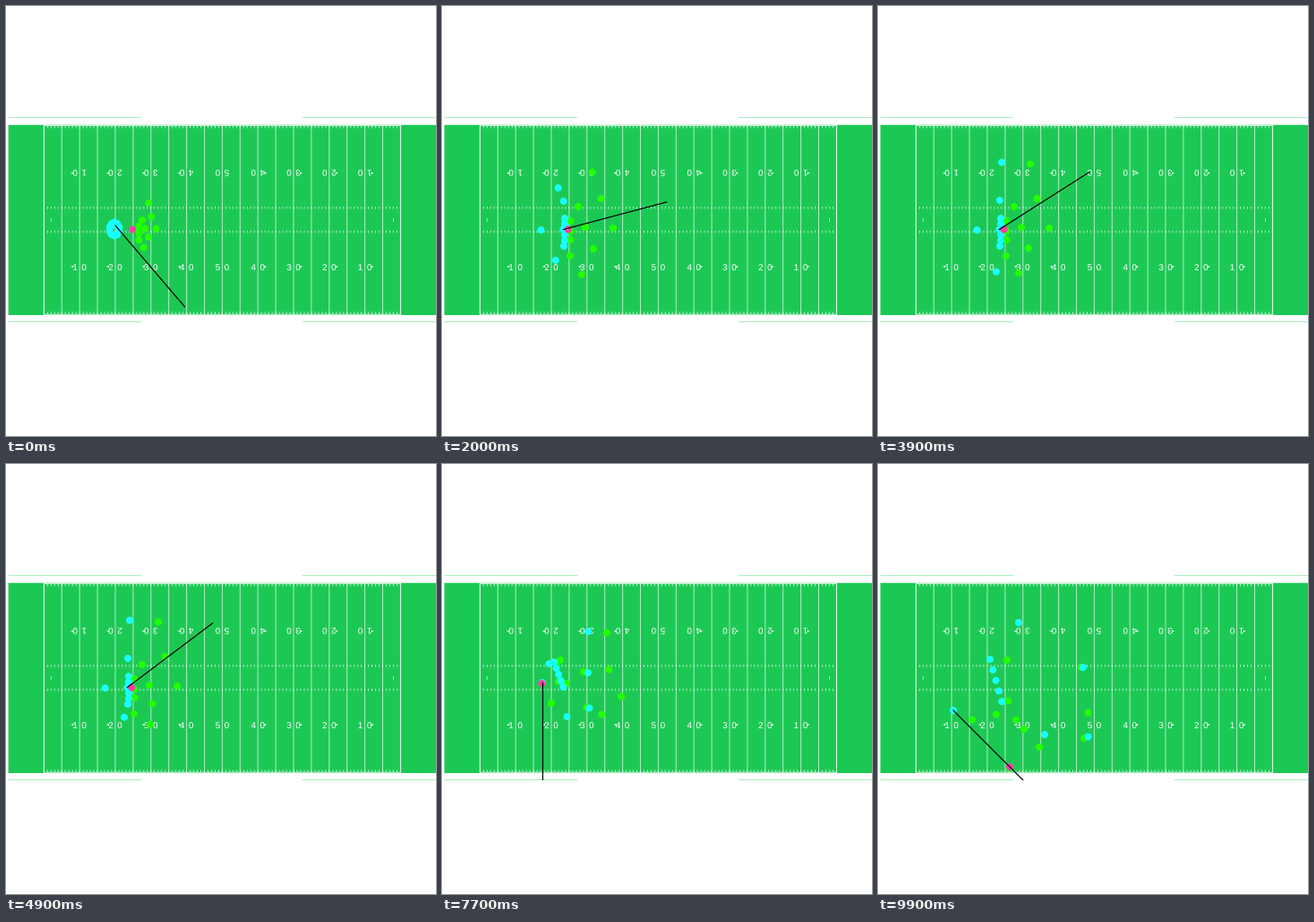
Write a matplotlib script that moves like this. It is 480 px wide and 480 px high and loops after 10 s.

```python
import numpy as np
import matplotlib.pyplot as plt
from matplotlib.animation import FuncAnimation
from matplotlib.patches import Circle, PathPatch, Polygon, Rectangle
from matplotlib.textpath import TextPath
from matplotlib.transforms import Affine2D

SIZE, DPI = 480, 100
PT = 72 / DPI  # points per pixel
FRAMES, STEP_MS = 100, 100

YARD = 3.98
MID_X, MID_Y = 241.4, 238.9
HALF = 53.33 * YARD / 2
TOP, BOTTOM = MID_Y - HALF, MID_Y + HALF
GRASS, PALE = "#1cc854", "#a9ecc0"
CYAN, LIME, PINK = "#19ffff", "#22ff00", "#ff3fa4"
RADIUS = 4
GAZE = 30 * YARD

# Phases of the play, in frames.
SHIFT, SHIFTED, SNAP, FAKE, THROW, LAST = 36, 60, 65, 77, 88, FRAMES - 1

# Each player: spot at the snap, at the fake and at the catch.
# A spot in front of these is where a shifting player first lines up.
PASSER = [(135.3, 249.5), (112, 244), (84, 275)]
SPLIT = [(138, 174.5), (163, 187), (229, 227)]
SLOT = [(136, 217), (163, 233), (186, 302)]
TIGHT = [(136, 268), (164.5, 272.5), (234.5, 304.5)]
MOTION = [(132, 301), (132, 267), (139.5, 282), (147, 338)]
TAIL = [(110.5, 250), (119.5, 223), (157, 177)]
LINE = [[(137, 237 + 6.2 * i), (125 + 2.6 * i, 221 + 7 * i),
         (125 + 3.3 * i, 218 + 11.8 * i)] for i in range(5)]

DEFENSE = [
    [(152, 224), (132, 219), (144, 219)],
    [(143.5, 240), (128, 223), (145.5, 264.5)],
    [(143.5, 251.5), (139, 245), (154, 285.5)],
    [(143.5, 261), (130, 243), (132, 279.5)],
    [(143, 279), (122, 267), (105, 285.5)],
    [(177.5, 215), (186.5, 229.5), (234.5, 277.5)],
    [(160, 247), (158, 232), (163, 296)],
    [(169, 271), (159, 265), (161.5, 271.5), (180, 316)],
    [(156, 300.5), (165, 282.5), (178.5, 279.5), (146, 339)],
]

# Where the passer faces: (frame, degrees).
FACING = [(0, -49.5), (11, 14.3), (22, 15), (29, 28), (49, 37), (62, 50),
          (66, 81), (FAKE, 270), (LAST, 315)]


def tween(times, points):
    """Follow the points at an even pace, speeding up out of the snap."""
    t = np.arange(FRAMES, dtype=float)
    u = np.clip((t - SNAP) / (FAKE - SNAP), 0, 1)
    t = np.where((u > 0) & (u < 1), SNAP + (FAKE - SNAP) * u ** 1.5, t)
    return np.stack([np.interp(t, times, axis) for axis in zip(*points)], axis=1)


def run(start, spots):
    """Jog from the huddle to the line, wait, then play."""
    if len(spots) == 3:
        spots = [spots[0], *spots]
    arrive = 10 + 0.34 * np.hypot(*np.subtract(spots[0], start))
    times = (0, arrive, SHIFT, SHIFTED, FAKE, LAST)
    lineup, ready, fake, end = spots
    before = tween(times[:4], [start, lineup, lineup, ready])
    after = tween((SNAP, FAKE, LAST), [ready, fake, end])
    return np.where(np.arange(FRAMES)[:, None] < SNAP, before, after)


def huddle(k):
    a = np.radians(54 + 108 * k)
    return 121 + 5.5 * np.cos(a), 249 + 7.5 * np.sin(a)


def loose(spot, centre=(152, 249)):
    """Defenders wait in a shrunken copy of their formation."""
    return np.add(centre, 0.4 * np.subtract(spot, centre))


def cover(receiver, cushion):
    """Man coverage: the cushion closes until the defender is beaten."""
    return [tuple(np.add(spot, np.multiply(cushion, k)))
            for spot, k in zip(receiver, (1, 0.65, -0.08))]


def ball_path(passer):
    f = np.arange(FRAMES)[:, None]
    spot = np.array([141, 249.5]) - f / SNAP * (1, 0)
    held = spot + (passer + (-0.5, 1) - spot) * np.clip((f - SNAP) / 3, 0, 1)
    flight = np.clip((f - THROW) / (LAST - THROW), 0, 1)
    return held + (np.array(MOTION[-1]) - held) * flight


fig = plt.figure(figsize=(SIZE / DPI, SIZE / DPI), dpi=DPI, facecolor="white")
ax = fig.add_axes([0, 0, 1, 1])
ax.set(xlim=(0, SIZE), ylim=(SIZE, 0))
ax.axis("off")


def yard(n):
    return MID_X + (n - 50) * YARD


def rows(y, x0, x1, color="white", alpha=1):
    ax.hlines(y, x0, x1, color=color, lw=PT, alpha=alpha, snap=False)


def columns(x, y0, y1, alpha):
    ax.vlines(x, y0, y1, color="white", lw=PT, alpha=alpha, snap=False)


def draw_digit(x, y, digit, flip):
    path = TextPath((0, 0), digit, size=9.8, prop={"family": "Liberation Sans"})
    box = path.get_extents()
    turn = (-1, 1) if flip else (1, -1)
    place = (Affine2D().translate(-(box.x0 + box.x1) / 2, -(box.y0 + box.y1) / 2)
             .scale(*turn).translate(x, y))
    ax.add_patch(PathPatch(path, transform=place + ax.transData,
                           fc="white", ec="none", zorder=2))


def draw_number(n, y, flip):
    label, side, x = str(min(n, 100 - n)), np.sign(n - 50), yard(n)
    for dx, digit in zip((-5, 5), label[::-1] if flip else label):
        draw_digit(x + dx, y, digit, flip)
    if side:
        tip, base, cy = x + side * 10, x + side * 7, y + (0.4 if flip else -0.6)
        ax.add_patch(Polygon([(tip, cy), (base, cy - 1.2), (base, cy + 1.2)],
                             fc="white", ec="none", zorder=2))


def draw_field():
    ax.add_patch(Rectangle((yard(-10), TOP), 120 * YARD, BOTTOM - TOP,
                           fc=GRASS, ec="none", snap=False))
    for y in (124.5, 352.5):
        rows([y, y], [3, 331], [151, SIZE], PALE)
    rows([TOP + 0.8, BOTTOM - 0.8], yard(0), yard(100), alpha=0.8)
    columns([yard(0), yard(100)], TOP, BOTTOM, 0.95)
    columns([yard(n) for n in range(5, 100, 5)], TOP, BOTTOM, 0.65)
    columns([yard(2), yard(98)], MID_Y - 2, MID_Y + 2, 0.65)
    ticks = [yard(n) for n in range(1, 100)]
    for y in (TOP + 2.4, 225.3, 252, BOTTOM - 2.4):
        columns(ticks, y - 1.3, y + 1.3, 0.65)
    for n in range(10, 100, 10):
        draw_number(n, 291.6, False)
        draw_number(n, 186.2, True)


def draw_dots(count, color, z):
    return [ax.add_patch(Circle((0, 0), RADIUS, fc=color, ec="none", zorder=z))
            for _ in range(count)]


draw_field()

passer = run((122, 245), PASSER)
blockers_and_backs = LINE + [SPLIT, SLOT, TIGHT, MOTION, TAIL]
defenders = DEFENSE + [cover(SPLIT, (32, 2)), cover(TIGHT, (55, -20))]
offense = [run(huddle(k), spots) for k, spots in enumerate(blockers_and_backs)]
defense = [run(loose(spots[0]), spots) for spots in defenders]
facing = np.radians(np.interp(np.arange(FRAMES), *zip(*FACING)))

paths = defense + offense + [passer, ball_path(passer)]
dots = (draw_dots(len(defense), LIME, 3) + draw_dots(len(offense) + 1, CYAN, 4)
        + draw_dots(1, PINK, 5))
gaze, = ax.plot([], [], color="black", lw=1.2 * PT, zorder=6)
gaze.set_clip_path(Rectangle((3, 124), SIZE - 3, 229, transform=ax.transData))


def update(f):
    for dot, path in zip(dots, paths):
        dot.center = path[f]
    x, y = passer[f]
    gaze.set_data([x, x + GAZE * np.cos(facing[f])],
                  [y, y - GAZE * np.sin(facing[f])])
    return [*dots, gaze]


anim = FuncAnimation(fig, update, frames=FRAMES, interval=STEP_MS,
                     repeat=True, repeat_delay=0, blit=False)
plt.show()
```
